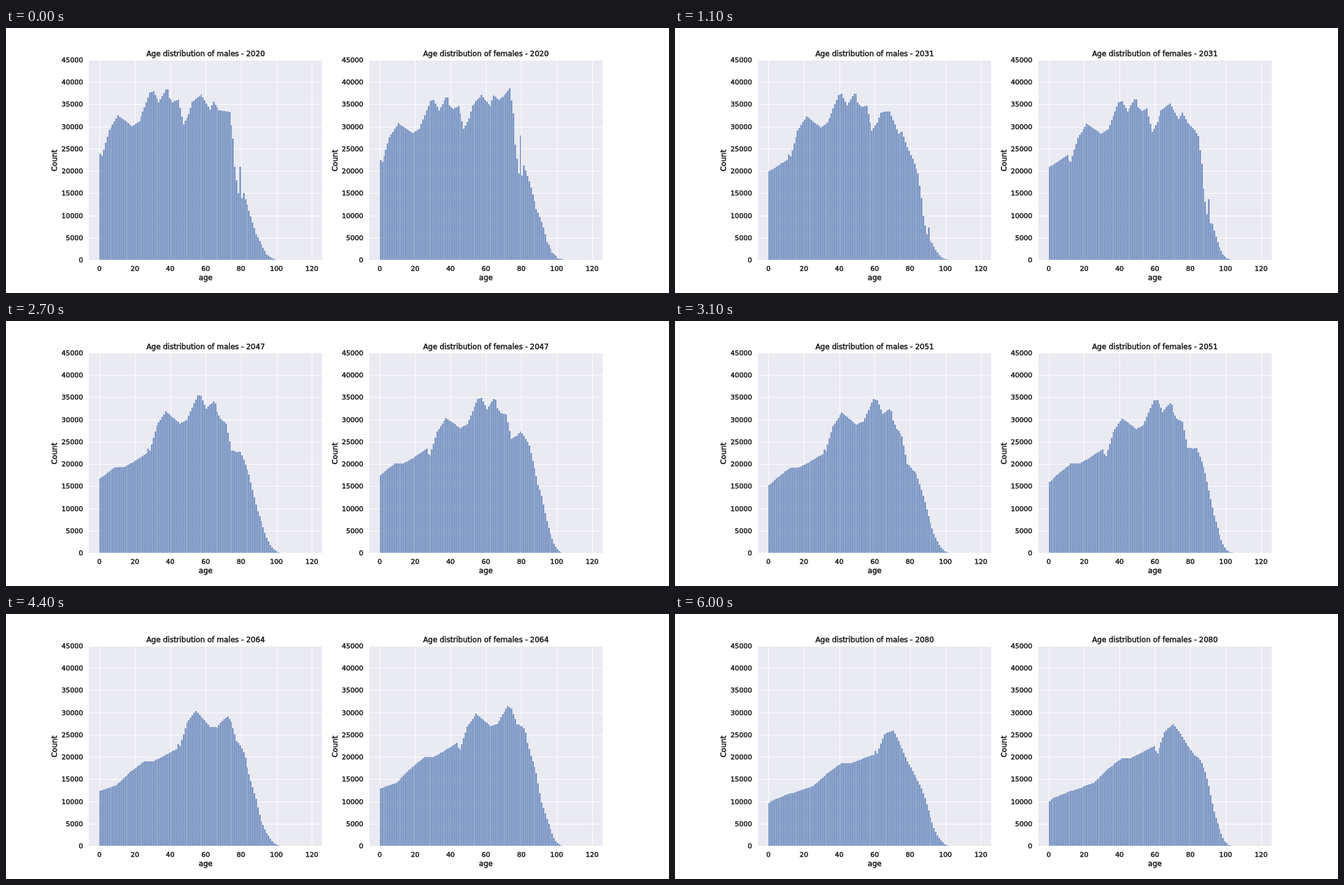
An HTML page with a canvas for the animation above (6.1 s loop, 1080 px wide and 432 px high).

```html
<!DOCTYPE html>
<html lang="en">
<head>
<meta charset="utf-8">
<title>Age distribution</title>
<style>
  html, body { margin: 0; width: 100%; height: 100%; overflow: hidden; background: #fff; }
  canvas, svg { position: absolute; left: 0; top: 0; width: 1080px; height: 432px; }
  text {
    font: 11px "DejaVu Sans", sans-serif;
    fill: #1c1c1c; stroke: #1c1c1c; stroke-width: .55px;
    text-anchor: middle;
  }
  .label { font-size: 12px; }
  .end { text-anchor: end; }
</style>
</head>
<body>
<canvas id="plot" width="1080" height="432"></canvas>
<svg id="labels" viewBox="0 0 1080 432"></svg>
<script>
const FIRST = 2020, YEARS = 61, STEP = 100, MAX_AGE = 110;
const BOTTOM = 378, HEIGHT = 326.16, WIDTH = 380.45, UNIT = WIDTH / 132;

// Turning points of the male population in the first year: [age, hundreds]
const profile = [
  [0, 238], [1, 234], [5, 292], [10, 325], [18, 301], [22, 312], [28, 376],
  [30, 379], [33, 354], [37, 383], [38, 383], [39, 364], [41, 355], [44, 360],
  [47, 305], [50, 328], [52, 356], [57, 372], [62, 338], [64, 356], [67, 337],
  [73, 333], [75, 273], [76, 210], [78, 150], [79, 210], [80, 139], [81, 150],
  [88, 58], [94, 12.5], [97, 3.5], [100, .5], [104, 0]
];

// Male newborns: [years after the first, hundreds]
const births = [
  [1, 226], [9, 205], [14, 194], [19, 193], [27, 168],
  [35, 137], [44, 124], [50, 116], [59, 101], [60, 97]
];

// hazard: log death rate around age 80, as a quadratic.
// ratio, birthRatio: size relative to the male curves.
const groups = [
  {
    name: 'males', left: 135, hazard: [-2.92, .11, .0006],
    ratio: () => 1, birthRatio: 1
  },
  {
    name: 'females', left: 591.55, hazard: [-3.42, .128, .0009],
    ratio: age => .945 * Math.exp(.872 * Math.exp(.085 * (age - 90))),
    birthRatio: 1.045
  }
];

const ctx = document.getElementById('plot').getContext('2d');
const labels = document.getElementById('labels');

function addText(x, y, str, cls, turn) {
  const el = document.createElementNS('http://www.w3.org/2000/svg', 'text');
  el.setAttribute('x', x);
  el.setAttribute('y', y);
  if (cls) el.setAttribute('class', cls);
  if (turn) el.setAttribute('transform', `rotate(${turn} ${x} ${y})`);
  el.textContent = str;
  labels.append(el);
  return el;
}

function interpolate(points, x) {
  const i = points.findIndex(p => p[0] >= x);
  if (i < 0) return 0;
  if (i === 0) return points[0][1];
  const [x0, y0] = points[i - 1], [x1, y1] = points[i];
  return y0 + (y1 - y0) * (x - x0) / (x1 - x0);
}

// Total death rate accumulated up to each age
function accumulate([c, b, q]) {
  const sum = [0];
  for (let a = 0; a < MAX_AGE; a++) {
    const x = a + .5 - 80;
    sum.push(sum[a] + Math.exp(c + b * x + q * x * x));
  }
  return sum;
}

// Each birth year moves up one age per step and shrinks by its death rate
function count(g, year, age) {
  const born = year - age;
  const from = Math.max(0, -born);
  const start = born > 0
    ? g.birthRatio * interpolate(births, born)
    : g.ratio(from) * interpolate(profile, from);
  return 100 * start * Math.exp(g.risk[from] - g.risk[age]);
}

const xAt = (g, age) => g.left + (age + 6) * UNIT;
const yAt = n => BOTTOM - n / 45000 * HEIGHT;
const centre = v => Math.round(v) + .5;

function drawPanel(g, year) {
  const x0 = Math.round(g.left), x1 = Math.round(g.left + WIDTH);
  ctx.save();
  ctx.beginPath();
  ctx.rect(x0, 52, x1 - x0, 326);
  ctx.clip();
  ctx.fillStyle = '#eaeaf2';
  ctx.fillRect(x0, 52, x1 - x0, 326);

  ctx.strokeStyle = '#fff';
  ctx.lineWidth = 1;
  ctx.beginPath();
  for (let a = 0; a <= 120; a += 20) {
    const x = centre(xAt(g, a));
    ctx.moveTo(x, 52);
    ctx.lineTo(x, BOTTOM);
  }
  for (let n = 0; n <= 45000; n += 5000) {
    const y = centre(yAt(n));
    ctx.moveTo(x0, y);
    ctx.lineTo(x1, y);
  }
  ctx.stroke();

  // Bars have whole-pixel edges with a hairline outline
  ctx.fillStyle = 'rgba(76, 114, 176, .75)';
  ctx.lineWidth = UNIT / 10;
  for (let a = 0; a < MAX_AGE; a++) {
    const n = count(g, year, a);
    if (n < 1) continue;
    const x = Math.round(xAt(g, a)), y = Math.round(yAt(n));
    const w = Math.round(xAt(g, a + 1)) - x, h = BOTTOM - y;
    ctx.fillRect(x, y, w, h);
    ctx.strokeRect(x, y, w, h);
  }
  ctx.restore();
}

for (const g of groups) {
  const mid = g.left + WIDTH / 2;
  g.risk = accumulate(g.hazard);
  g.title = addText(mid, 46, '', 'label');
  addText(mid, 411, 'age', 'label');
  addText(g.left - 52, 216, 'Count', 'label', -90);
  for (let a = 0; a <= 120; a += 20) addText(xAt(g, a), 396, a);
  for (let n = 0; n <= 45000; n += 5000) addText(g.left - 9.5, yAt(n) + 4, n, 'end');
}

let shown = -1;
function frame() {
  const step = Math.floor(performance.now() / STEP) % YEARS;
  if (step !== shown) {
    shown = step;
    ctx.clearRect(0, 0, 1080, 432);
    for (const g of groups) {
      drawPanel(g, step);
      g.title.textContent = `Age distribution of ${g.name} - ${FIRST + step}`;
    }
  }
  requestAnimationFrame(frame);
}
frame();
</script>
</body>
</html>
```
